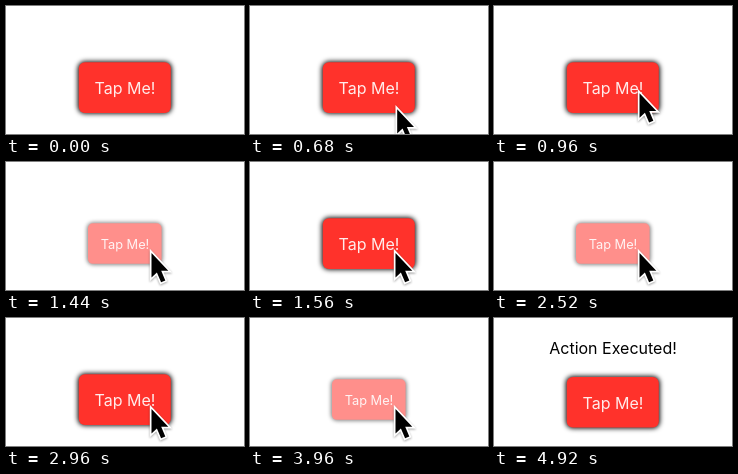
Recreate the animation shown at these times as an HTML page. Size 238 px wide and 128 px high, loop 5.96 s.

```html
<!DOCTYPE html>
<html lang="en">
<head>
<meta charset="utf-8">
<title>Long press button</title>
<style>
  html, body { margin: 0; width: 100%; height: 100%; overflow: hidden; background: #fff; }
  svg { display: block; width: 238px; height: 128px; }
  text { font: 400 16px Inter, Roboto, sans-serif; text-anchor: middle; }
</style>
</head>
<body>
<svg viewBox="0 0 238 128">
  <defs>
    <filter id="blur" x="-20%" y="-30%" width="140%" height="160%">
      <feGaussianBlur stdDeviation="2.6"/>
    </filter>
    <filter id="soft" x="-50%" y="-50%" width="200%" height="200%">
      <feGaussianBlur stdDeviation="1.2"/>
    </filter>
    <path id="arrow" d="M0 0V24.4L5.4 19.4L9.6 29.2L13.8 27.4L9.7 17.8H16.8Z"/>
  </defs>
  <rect width="238" height="128" fill="#fff"/>
  <text id="message" x="119" y="36" fill="#000">Action Executed!</text>
  <g id="button">
    <rect x="-47" y="-26" width="94" height="52" rx="7" fill="#000" filter="url(#blur)"/>
    <rect x="-46" y="-25.3" width="92" height="50.6" rx="6" fill="#ff322b"/>
    <text x="0.2" y="6.3" fill="#ffeceb">Tap Me!</text>
  </g>
  <g id="cursor">
    <use href="#arrow" y="1" fill="#000" stroke="#000" stroke-width="3.4" opacity=".35" filter="url(#soft)"/>
    <use href="#arrow" fill="#000" stroke="#fff" stroke-width="3.4" paint-order="stroke"/>
  </g>
</svg>
<script>
  const LOOP = 5960;
  const PRESSES = [[1440, 1540], [1960, 2030], [2480, 2720], [3280, 4280]];
  const EXECUTED = 4280;
  const [message, button, cursor] =
    ["message", "button", "cursor"].map(id => document.getElementById(id));

  const progress = (t, from, to) => Math.min(1, Math.max(0, (t - from) / (to - from)));
  const easeOut = p => 1 - (1 - p) ** 2;
  const show = (el, on) => el.setAttribute("visibility", on ? "visible" : "hidden");

  function draw(t) {
    const pressed = PRESSES.some(([from, to]) => t >= from && t < to);
    const executed = t >= EXECUTED;
    button.setAttribute("transform",
      `translate(118.8 ${executed ? 84.3 : 81.6}) scale(${pressed ? 0.8 : 1})`);
    button.setAttribute("opacity", pressed ? 0.54 : 1);
    show(message, executed);

    const enter = easeOut(progress(t, 480, 1000));
    const settle = progress(t, 1080, 1200);
    const leave = progress(t, 4840, 4920);
    const x = 150 - 4.5 * enter;
    const y = 130 - 43 * enter + 4 * settle + 42 * leave;
    cursor.setAttribute("transform", `translate(${x} ${y})`);
    show(cursor, t >= 520 && t < 4920);
  }

  const start = performance.now();
  function tick() {
    draw((performance.now() - start) % LOOP);
    requestAnimationFrame(tick);
  }
  draw(0);
  requestAnimationFrame(tick);
</script>
</body>
</html>
```
